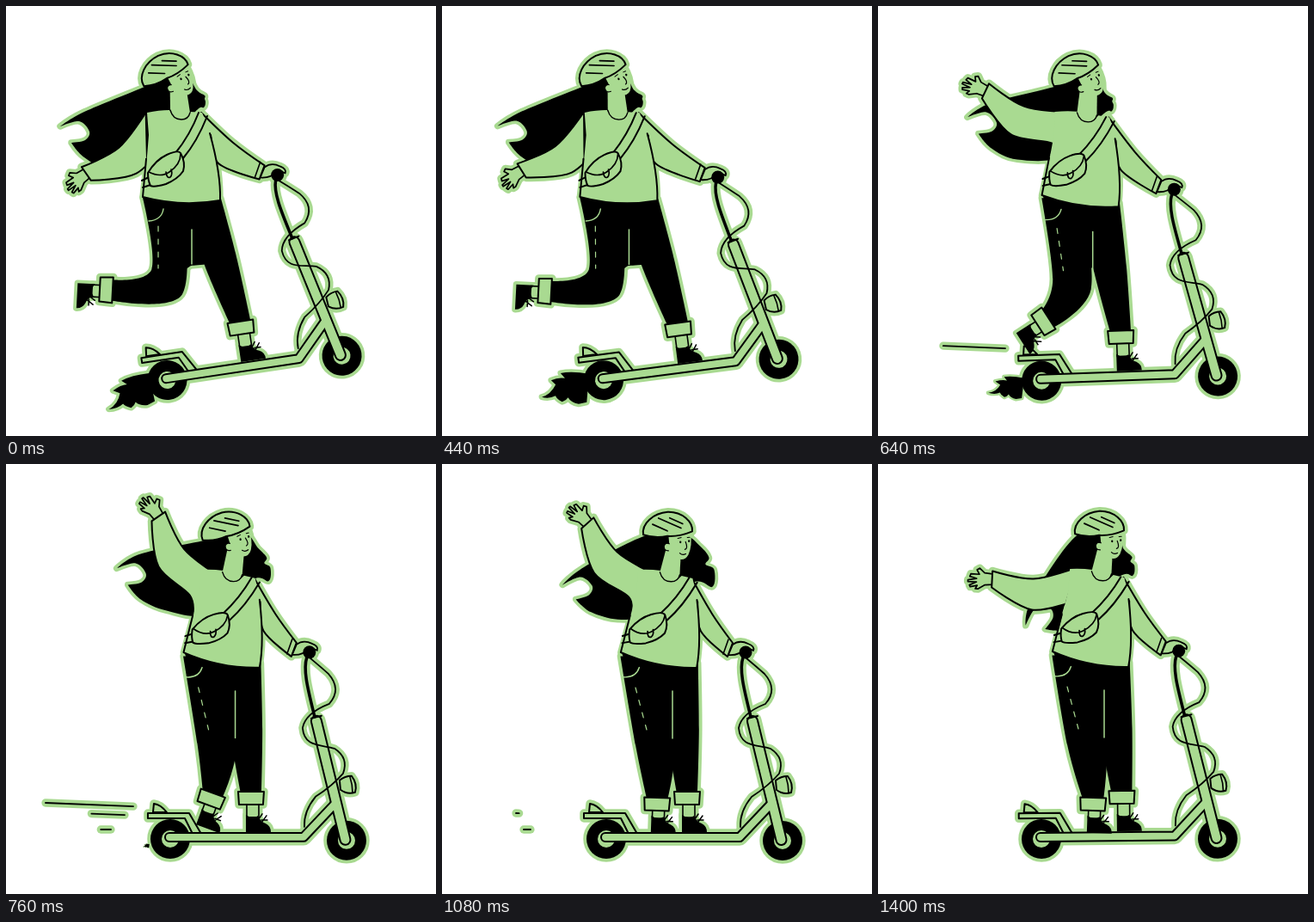
An HTML page with a canvas that plays this animation: 500x500 px, repeating every 1.44 s.

```html
<!DOCTYPE html>
<html lang="en">
<head>
<meta charset="utf-8">
<title>Scooter ride</title>
<style>
html, body { margin: 0; width: 100%; height: 100%; overflow: hidden; background: #fff; }
canvas { display: block; width: 100vw; height: 100vh; }
</style>
</head>
<body>
<canvas id="stage" width="500" height="500"></canvas>
<script>
const ctx = document.getElementById('stage').getContext('2d');
const GREEN = '#a9da91', BLACK = '#000';
const LOOP = 1440, STEP = 40, HALO = 7.5;
const RAD = Math.PI / 180;
let halo = false;

const clamp = p => Math.max(0, Math.min(1, p));
const mix = (a, b, p) => a + (b - a) * p;
const smooth = (t, from, to) => {
  const p = clamp((t - from) / (to - from));
  return p * p * (3 - 2 * p);
};
const bump = (t, from, to) => Math.sin(Math.PI * clamp((t - from) / (to - from)));
const add = ([x, y], dx, dy) => [x + dx, y + dy];
const between = (a, b, p = 0.5) => [mix(a[0], b[0], p), mix(a[1], b[1], p)];

function unit(a, b) {
  const dx = b[0] - a[0], dy = b[1] - a[1], len = Math.hypot(dx, dy);
  return [dx / len, dy / len];
}

// Turns points of a local frame [x, y, degrees] into stage points
function mapper([x, y, deg]) {
  const c = Math.cos(deg * RAD), s = Math.sin(deg * RAD);
  return (px, py) => [x + px * c - py * s, y + px * s + py * c];
}

// All joints follow from a few eased phases of the ride
function poseAt(t) {
  const rise = smooth(t, 400, 800), step = smooth(t, 400, 840), level = smooth(t, 340, 780);
  const bob = bump(t, 760, 1080), rest = smooth(t, 1080, 1400), drop = smooth(t, 900, 1300);

  const scooter = [187.5 + 3.5 * level - rest, 435 + level, -8.5 * (1 - level) - 0.6 * rest];
  const onScooter = mapper(scooter);
  const hip = [204 + 48 * rise + 7 * bob - 5 * rest, 224 + 4 * rise + 5 * bob - rest];
  const torso = [...hip, 9 * rise - 2 * bob];
  const onTorso = mapper(torso);
  const neck = onTorso(-2, -92);
  return {
    scooter, hip, torso, onTorso, neck, rise,
    grip: onScooter(162, -217),
    head: [...add(neck, -9 + 6 * rise, -31 - 4 * rise), -23 + 22 * smooth(t, 620, 920)],
    armAngle: 145 + 93 * rise - 55 * smooth(t, 960, 1400),
    backKnee: add(hip, -17 + 13 * step, 97),
    backFoot: [mix(117, 250, step), mix(330, 395, step), 93 - 91 * smooth(t, 460, 880)],
    frontFoot: [...onScooter(94, -48), scooter[2]],
    fork: [97 + 72 * step + 31 * drop * drop, 146 - 24 * smooth(t, 400, 920) + 46 * drop, -45 * drop * drop],
    curl: smooth(t, 600, 860) - 0.6 * rest
  };
}

function paint(path, fill, stroke, width = 2) {
  ctx.lineJoin = ctx.lineCap = 'round';
  if (halo) {
    ctx.strokeStyle = GREEN;
    ctx.lineWidth = (stroke ? width : 0) + HALO;
    ctx.stroke(path);
    return;
  }
  if (fill) { ctx.fillStyle = fill; ctx.fill(path); }
  if (stroke) { ctx.strokeStyle = stroke; ctx.lineWidth = width; ctx.stroke(path); }
}
const draw = (d, fill, stroke, width) => paint(new Path2D(d), fill, stroke, width);
// Details inside a shape need no halo
const detail = (d, stroke = BLACK, width = 1.6) => { if (!halo) draw(d, null, stroke, width); };

// Smooth curve through points; listed indices stay sharp
function curve(points, corners = [], closed = true) {
  const n = points.length, path = new Path2D();
  const at = i => closed ? points[(i + n) % n] : points[Math.max(0, Math.min(n - 1, i))];
  const tan = i => corners.includes(i % n) ? [0, 0]
    : [(at(i + 1)[0] - at(i - 1)[0]) / 6, (at(i + 1)[1] - at(i - 1)[1]) / 6];
  path.moveTo(...points[0]);
  for (let i = 0; i < (closed ? n : n - 1); i++) {
    const a = at(i), b = at(i + 1), u = tan(i), v = tan(i + 1);
    path.bezierCurveTo(a[0] + u[0], a[1] + u[1], b[0] - v[0], b[1] - v[1], ...b);
  }
  return path;
}

function circle(x, y, r, fill) {
  const path = new Path2D();
  path.arc(x, y, r, 0, 7);
  paint(path, fill);
}

function local([x, y, deg], body, scale = 1) {
  ctx.save();
  ctx.translate(x, y);
  ctx.rotate(deg * RAD);
  ctx.scale(scale, scale);
  body();
  ctx.restore();
}

// A line shoots out to the left, then its right end catches up
function drawSpeedLine(t, start, end, left, right, y, slope) {
  const p = (t - start) / (end - start);
  if (p <= 0 || p >= 1) return;
  const a = mix(right, left, Math.sin(clamp(2 * p) * Math.PI / 2));
  const b = mix(right, left, 1 - Math.cos(clamp(2 * p - 1) * Math.PI / 2));
  draw(`M${a},${y + (a - left) * slope}L${b},${y + (b - left) * slope}`, null, BLACK, 1.8);
}

function drawFlame(t) {
  const size = 0.92 * (1 - clamp((t - 580) / 205));
  if (!size) return;
  const flick = Math.sin(t / 19) * 2;
  local([166, 444, -12 + 19 * clamp(t / 500)], () => draw(
    `M4-18Q-18-20-32-16L-26-10Q-34-11-${45 + flick}-6L-37-1Q-42 12-${55 + flick} 16Q-44 18-36 13
     Q-34 17-27 20Q-22 18-20 14Q-16 20-6 21L4 18Z`, BLACK), size);
}

function drawScooter(frame) {
  const deck = 'M190,434H346L382,396', column = 'M361,299L394.5,437';
  local(frame, () => {
    ctx.translate(-191, -436);
    draw('M171,405L172,395Q180,396 187,405Z', GREEN, BLACK);
    for (const [x, y] of [[191, 436], [396, 438]]) {
      circle(x, y, 23, BLACK);
      circle(x, y, 10, GREEN);
    }
    draw('M165,406H213L227,430H217L208,412H165Z', GREEN, BLACK);
    draw(column, null, BLACK, 14);
    draw(deck, null, BLACK, 12);
    detail(deck, GREEN, 8);
    detail(column, GREEN, 10);
    detail('M355,296L367,293', BLACK, 2);
    draw('M350,225C345,240 352,265 359,294', null, BLACK, 3.5);
    draw(`M354,226Q366,236 375,244Q391,262 376,279Q348,290 345,307C347,330 366,326 382,331
      Q399,342 392,360Q380,374 360,387Q346,404 347,422`, null, BLACK, 1.8);
    draw('M388,368Q394,363 402,363Q409,372 406,382Q397,385 389,379Z', GREEN, BLACK);
    detail('M400,364Q403,373 403,382');
  });
}

// Fork-tipped lock behind the head and a short curl in front of the neck
function drawHair({ head, fork, neck, onTorso, curl }) {
  const f = mapper(fork), h = mapper(head);
  const front = (x, y, dx, dy) => add(neck, x + dx * curl, y + dy * curl);
  paint(curve([
    h(-24, -19), f(-6, -23), f(-34, -6), f(-12, -12), f(0, 0), f(-5, 10), f(-21, 13),
    f(-6, 30), f(24, 43), onTorso(-25, -50),
    front(18, -9, 9, 10), front(28, -14, 22, 20), front(30, -20, 22, 6),
    front(29, -24, 13, 4), front(29, -28, 17, 0), front(20, -34, 16, -7), h(20, -19)
  ], [2, 6]), BLACK);
}

// Trouser leg around hip, knee and ankle
function drawLeg(hip, knee, foot, hipHalf, kneeHalf) {
  const ankle = mapper(foot), down = unit(hip, knee), on = unit(knee, foot);
  const along = unit([0, 0], add(down, ...on)), side = [-along[1] * kneeHalf, along[0] * kneeHalf];
  paint(curve([
    add(hip, -hipHalf, 0), add(knee, ...side), ankle(-12, -5),
    ankle(12, -5), add(knee, -side[0], -side[1]), add(hip, hipHalf, 0)
  ], [0, 2, 3, 5]), BLACK);
}

function drawFoot(foot, drop) {
  local(foot, () => {
    draw(`M-5,4V${16 + drop}H9V4Z`, GREEN, BLACK, 1.6);
    ctx.translate(1, drop);
    draw('M-7,13Q1,19 7,14Q10,21 16,23Q22,26 22,33H-7Z', BLACK);
    detail('M8,18L12,12M12,21L17,14M11,19L18,19', BLACK, 1.5);
    ctx.translate(-1, -drop);
    draw('M-15,-7H15L14,8H-14Z', GREEN, BLACK);
  });
}

function drawLegs({ hip, onTorso, backKnee, backFoot, frontFoot, rise }) {
  const hipL = onTorso(-22, -1), hipR = onTorso(23, 0), frontKnee = between(hipR, frontFoot);
  const crotch = add(hip, 11, 78);
  paint(curve([onTorso(-44, -2), onTorso(45, 1), frontKnee, crotch, backKnee], [0, 1, 2, 3, 4]), BLACK);
  drawLeg(hipL, backKnee, backFoot, 23, 23);
  drawLeg(hipR, frontKnee, frontFoot, 23, 19);
  const seam = add(hip, 12 + 4 * rise, 36);
  detail(`M${seam}L${add(seam, 0, 40 + 15 * rise)}`, GREEN, 1.5);
  ctx.setLineDash([6, 9]);
  detail(`M${add(hip, -27, 32)}L${add(backKnee, -10, -16)}`, GREEN, 1.2);
  ctx.setLineDash([]);
  drawFoot(backFoot, 1);
  drawFoot(frontFoot, 7);
}

function drawWavingArm({ onTorso, armAngle }) {
  const shoulder = onTorso(-32, -84), d = [Math.cos(armAngle * RAD), Math.sin(armAngle * RAD)];
  const at = (along, side) => add(shoulder, d[0] * along + d[1] * side, d[1] * along - d[0] * side);
  local([...at(96, 0), armAngle - 90], () => draw(
    'M-6,-2L-7,9L-12,15L-10,18L-5,15L-5,25L-2,26L0,18L2,28L4,28L4,18L8,26L10,25L8,17L12,19L12,16L7,8L6,-2Z',
    GREEN, BLACK, 1.7));
  paint(curve([at(0, -18), at(48, -3), at(96, -9.5), at(96, 9.5), at(48, 33), at(0, 22), onTorso(-41, -46)],
    [0, 2, 3, 6], false), GREEN, BLACK);
}

function drawRidingArm({ onTorso, grip }) {
  const shoulder = onTorso(23, -100), top = add(grip, -15, -11), bottom = add(grip, -21, 5);
  const elbow = add(between(shoulder, top), 0, 4);
  paint(curve([shoulder, elbow, top, bottom, onTorso(43, -41), onTorso(34, -74)], [0, 2, 3], false), GREEN, BLACK);
  detail(`M${add(top, -5, -4)}L${add(bottom, -5, -3)}`);
}

function drawHand(grip) {
  local([...grip, 0], () => {
    draw('M-15,-9Q-7,-15 3,-10Q11,-7 9,-2Q4,-5 0,-4Q-8,4 -20,3Z', GREEN, BLACK, 1.8);
    circle(0, 0, 7.5, BLACK);
  });
}

function drawTorso(frame) {
  local(frame, () => {
    draw('M-40,-100Q-26,-103 -14,-103Q-2,-82 11,-101L24,-100Q36,-74 41,-44Q45,-24 45,2Q0,10 -45,-2Q-41,-34 -38,-74Z', GREEN);
    detail('M-41,-46Q-43,-25 -45,-2Q0,10 45,2Q46,-29 33,-76', BLACK, 2);
    detail('M20,-100Q10,-74 -7,-53M30,-96Q18,-66 2,-47M-46,-21L-36,-26M-45,-13L-33,-17', BLACK, 2);
    draw('M-39,-30Q-30,-45 -17,-51Q-4,-57 -1,-53Q5,-42 2,-32Q-4,-23 -18,-17Q-32,-13 -36,-15Q-39,-21 -39,-30Z', GREEN, BLACK, 2);
    detail('M-38,-31Q-24,-24 -14,-31Q-1,-40 -1,-52M-18,-31Q-17,-23 -13,-25Q-10,-28 -12,-34', BLACK, 1.7);
    detail('M-38,26Q-23,25 -21,12', GREEN, 1.4);
  });
}

function drawHead({ head, neck }) {
  const at = mapper(head), point = (x, y) => add(neck, x, y);
  const collar = `M${point(-11, -11)}Q${point(-8, 0)} ${point(2, 0)}Q${point(10, 0)} ${point(12, -8)}`;
  draw(`${collar}L${at(16, 7)}L${at(0, -6)}Z`, GREEN);
  detail(collar, BLACK, 1.4);
  local(head, () => {
    ctx.translate(-27, -20);
    draw('M29,-2H55Q57,14 52,24Q48,31 41,29L29,20Q23,19 24,13Q26,9 30,11Z', GREEN);
    detail('M29,19Q23,19 24,13Q26,9 30,11M49,9Q52,17 48,18M42,22Q45,25 49,23', BLACK, 1.2);
    detail('M43,9V9.5M53,8V8.5', BLACK, 2.2);
    detail('M40,5L44,4M51,4L54,4', BLACK, 1);
    draw('M0,0C-2,-13 12,-25 29,-26C46,-26 58,-14 57,-3Q42,3 28,2Q14,5 0,0Z', GREEN, BLACK, 2);
    detail('M11,-12L28,-4M18,-19L44,-7M31,-19L46,-12', BLACK, 1.7);
  });
}

function drawScene(t, pose) {
  drawSpeedLine(t, 520, 1000, 46, 148, 394, 0.04);
  drawSpeedLine(t, 640, 1090, 86, 138, 406, 0.04);
  drawSpeedLine(t, 700, 1120, 95, 122, 425, 0);
  drawFlame(t);
  drawScooter(pose.scooter);
  drawHair(pose);
  drawLegs(pose);
  drawRidingArm(pose);
  drawWavingArm(pose);
  drawTorso(pose.torso);
  drawHead(pose);
  drawHand(pose.grip);
}

function frame(now) {
  const t = Math.floor(now % LOOP / STEP) * STEP, pose = poseAt(t);
  ctx.fillStyle = '#fff';
  ctx.fillRect(0, 0, 500, 500);
  for (halo of [true, false]) drawScene(t, pose);
  requestAnimationFrame(frame);
}
frame(0);
</script>
</body>
</html>
```
